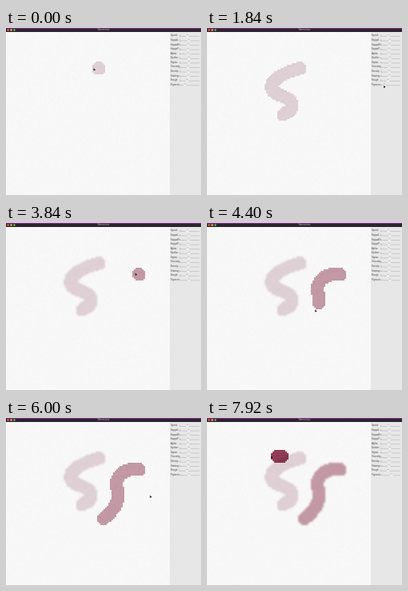
An HTML page with a canvas for the animation above (8 s loop, 244 by 209 pixels).

```html
<!DOCTYPE html>
<html lang="en">
<head>
<meta charset="utf-8">
<title>Watercolour</title>
<style>
html, body { margin: 0; width: 100%; height: 100%; overflow: hidden; background: #f8f8f8; }
canvas { display: block; width: 244px; height: 209px; }
</style>
</head>
<body>
<canvas id="stage" width="244" height="209"></canvas>
<script>
const W = 244, H = 209, LOOP = 8000, STEP = 80;
const LAG = 90, CELL = 2, RADIUS = 8.3;
const ctx = document.getElementById('stage').getContext('2d');

// Each move continues from the end of the previous one
const moves = [
  { from: -150, to: 870, path: 'C98 54 80 64 80 74S105 84 105 95 102 102 95 108', ink: [229, 214, 218] },
  { from: 1000, to: 1800, path: 'L222 73' },
  { from: 1840, to: 2560, path: 'L229 72', drag: true },
  { from: 3250, to: 3700, path: 'L166 64' },
  { from: 3720, to: 4720, path: 'C150 62 138 70 138 82S147 104 122 125', ink: [200, 157, 169] },
  { from: 4720, to: 5200, path: 'Q170 132 181 98' },
  { from: 6250, to: 6600, path: 'L224 72' },
  { from: 6600, to: 6900, path: 'L231 71', drag: true },
  { from: 7060, to: 7700, path: 'L93 47' },
  { from: 7720, to: 8000, path: 'L78 49', ink: [150, 62, 90] }
];

let last = '116 50';
for (const m of moves) {
  m.curve = document.createElementNS('http://www.w3.org/2000/svg', 'path');
  m.curve.setAttribute('d', `M${last}${m.path}`);
  m.length = m.curve.getTotalLength();
  const end = m.curve.getPointAtLength(m.length);
  last = `${end.x} ${end.y}`;
}

const labels = ['Speed:', 'Kappa1:', 'KappaW:', 'KappaP:', 'Alpha:', 'Epsilon:',
  'Sigma:', 'Viscosity:', 'Density:', 'Staining:', 'Rough:', 'Pigment:'];

const clamp = v => Math.min(1, Math.max(0, v));
const smooth = u => u * u * (3 - 2 * u);
const rowY = i => 9.6 + i * 5.58;
const hash = (x, y) => {
  const s = Math.sin(x * 12.9898 + y * 78.233) * 43758.5453;
  return s - Math.floor(s);
};

function along(m, t) {
  const u = clamp((t - m.from) / (m.to - m.from));
  return m.curve.getPointAtLength(m.length * smooth(u));
}

const latest = (t, test) => moves.filter(m => m.from <= t && test(m)).pop();
const pointer = t => along(latest(t, () => true), t);

function layer(paint) {
  const c = document.createElement('canvas');
  c.width = W;
  c.height = H;
  if (paint) paint(c.getContext('2d'));
  return c;
}

function box(g, color, x, y, w, h) {
  g.fillStyle = color;
  g.fillRect(x, y, w, h);
}

function dot(g, x, y, r, color) {
  g.fillStyle = color;
  g.beginPath();
  g.arc(x, y, r, 0, 7);
  g.fill();
}

function text(g, s, x, y, size, color, align = 'left') {
  g.font = size + 'px Arial, "Liberation Sans", sans-serif';
  g.textAlign = align;
  g.textBaseline = 'middle';
  g.fillStyle = color;
  g.fillText(s, x, y);
}

function thumb(g, x, y) {
  box(g, '#f6f6f6', x - 1.5, y, 3, 1.6);
  box(g, '#999', x - 0.5, y - 1.4, 1, 1);
}

function paintPaper(g) {
  box(g, '#f9f9f9', 0, 0, W, H);
  for (let y = 5; y < H; y += 2) {
    for (let x = 0; x < 205; x += 2) {
      box(g, `rgba(110,110,110,${hash(x, y) * 0.02})`, x, y, 2, 2);
    }
  }
}

function paintPanel(g) {
  box(g, '#e7e7e7', 205, 5, 39, H - 5);
  labels.forEach((s, i) => {
    const y = rowY(i);
    text(g, s, 206, y, 2.8, '#444');
    box(g, '#c2c2c2', 218, y + 0.4, 24, 0.8);
    box(g, '#999', 217.5, y - 0.8, 0.6, 2);
    if (i < labels.length - 1) thumb(g, 228 + 3 * (hash(i, 1) - 0.5), y);
  });
}

function paintTitle(g) {
  box(g, '#2b252d', 0, 0, W, 5);
  box(g, '#8d1f96', 0, 0, W, 1);
  ['#f4605a', '#f3b93c', '#53c04a'].forEach((c, i) => dot(g, 2.6 + i * 3.9, 2.6, 1.3, c));
  text(g, 'Watercolour', 122, 2.7, 2.8, '#bbb', 'center');
}

const backdrop = layer(g => [paintPaper, paintPanel, paintTitle].forEach(paint => paint(g)));
const wash = layer();
const wet = wash.getContext('2d');

function stamp(p, ink, seen) {
  const cx = p.x + 0.5, cy = p.y + 0.5;
  const cell = v => Math.floor(v / CELL);
  for (let j = cell(cy - RADIUS); j <= cell(cy + RADIUS); j++) {
    for (let i = cell(cx - RADIUS); i <= cell(cx + RADIUS); i++) {
      const id = j * W + i;
      const far = Math.hypot((i + 0.5) * CELL - cx, (j + 0.5) * CELL - cy) > RADIUS;
      if (far || seen.has(id)) continue;
      seen.add(id);
      const grain = (hash(i, j) - 0.5) * 4;
      box(wet, `rgb(${ink.map(c => Math.round(c + grain)).join()})`, i * CELL, j * CELL, CELL, CELL);
    }
  }
}

function paintStroke(m, t) {
  const end = Math.min(t - LAG, m.to);
  if (end < m.from) return;
  wet.clearRect(0, 0, W, H);
  const seen = new Set();
  for (let k = m.from; k <= end; k += 12) stamp(along(m, k), m.ink, seen);
  const soak = clamp((t - m.to - 200) / 3000);
  ctx.save();
  ctx.globalCompositeOperation = 'multiply';
  ctx.filter = `blur(${0.3 + soak * 0.6}px)`;
  ctx.drawImage(wash, 0, 0);
  ctx.restore();
}

function paintArrow({ x, y }) {
  ctx.fillStyle = '#111';
  ctx.beginPath();
  ctx.moveTo(x - 0.8, y - 1.3);
  ctx.lineTo(x - 0.8, y + 2);
  ctx.lineTo(x + 1.5, y + 1);
  ctx.fill();
}

function draw(t) {
  ctx.drawImage(backdrop, 0, 0);
  moves.filter(m => m.ink).forEach(m => paintStroke(m, t));
  const drag = latest(t, m => m.drag);
  thumb(ctx, drag ? along(drag, t).x : 224, rowY(labels.length - 1));
  paintArrow(pointer(t));
}

let shown = -1;
const start = performance.now();
function tick(now) {
  const t = Math.floor((Math.max(0, now - start) % LOOP) / STEP) * STEP;
  if (t !== shown) draw(shown = t);
  requestAnimationFrame(tick);
}
tick(start);
</script>
</body>
</html>
```
